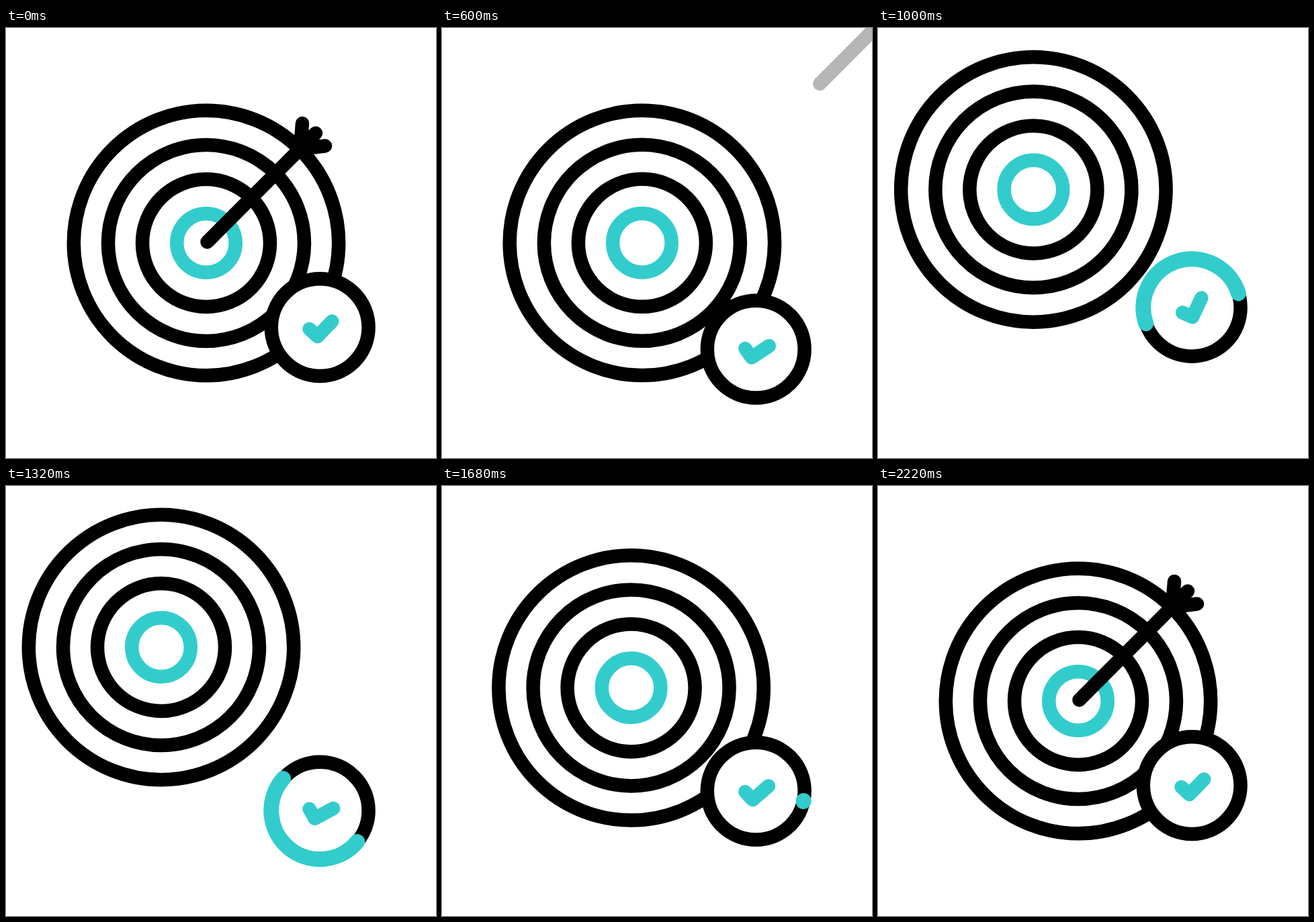
Recreate the animation shown at these times as an HTML page. Size 640 px wide and 640 px high, loop 2400 ms.

```html
<!DOCTYPE html>
<html lang="en">
<head>
<meta charset="utf-8">
<title>Target</title>
<style>
  html, body { margin: 0; width: 100%; height: 100%; overflow: hidden; background: #fff; }
  svg { display: block; width: 100%; height: 100%; }
  .line { fill: none; stroke: #000; stroke-width: 20.5; stroke-linecap: round; stroke-linejoin: round; }
  .teal { stroke: #3cc; }
  .wide { stroke-width: 23; }
</style>
</head>
<body>
<svg viewBox="0 0 640 640">
  <g id="target" class="line">
    <circle cx="298" cy="320" r="197.2"/>
    <circle cx="298" cy="320" r="146"/>
    <circle cx="298" cy="320" r="95"/>
    <circle cx="298" cy="320" r="43.8" class="teal"/>
  </g>
  <g id="streaks" class="line teal">
    <path/>
    <path/>
  </g>
  <path id="arrow" class="line" d="M299.5 318.5L461 156.5M441 142L438 180L475 175.5"/>
  <g id="badge">
    <circle class="line" cx="467.2" cy="445.6" r="72.4" style="fill:#fff"/>
    <path id="sweep" class="line teal wide"/>
    <g id="tick">
      <path class="line teal" d="M451.5 448L463.5 459L485.3 436.5"/>
      <path id="pulse" class="line wide" d="M451.5 448L463.5 459L485.3 436.5"/>
    </g>
  </g>
</svg>
<script>
const LOOP = 2400;
const CX = 467.2, CY = 445.6, R = 72.4;
const el = id => document.getElementById(id);
const set = (node, name, value) => node.setAttribute(name, value);
const show = (node, on) => set(node, 'visibility', on ? 'visible' : 'hidden');

// Smooth progress from 0 to 1 between two times
function ease(t, from, to) {
  const u = Math.min(1, Math.max(0, (t - from) / (to - from)));
  return u * u * (3 - 2 * u);
}

// Monotone cubic curve through [time, value] keys
function track(keys) {
  const secant = i => (keys[i + 1][1] - keys[i][1]) / (keys[i + 1][0] - keys[i][0]);
  const slopes = keys.map((k, i) => {
    if (i === 0 || i === keys.length - 1) return 0;
    const a = secant(i - 1), b = secant(i);
    return a * b > 0 ? 2 * a * b / (a + b) : 0;
  });
  return t => {
    if (t <= keys[0][0]) return keys[0][1];
    for (let i = 0; i < keys.length - 1; i++) {
      const [t0, v0] = keys[i], [t1, v1] = keys[i + 1];
      if (t > t1) continue;
      const h = t1 - t0, u = (t - t0) / h, s = u * u * (3 - 2 * u);
      return v0 + (v1 - v0) * s
        + h * u * (1 - u) * ((1 - u) * slopes[i] - u * slopes[i + 1]);
    }
    return keys[keys.length - 1][1];
  };
}

const bob = track([[200, 0], [380, 20], [545, 37.5], [760, -3.5], [950, -36],
  [1000, -29.5], [1280, 33.5], [1320, 37.5], [1560, 20], [1820, 0]]);
const tilt = track([[200, 0], [380, 5.5], [660, 13], [760, 8.5], [1000, -19],
  [1060, -20], [1340, 18], [1560, 11], [1820, 0]]);
const sweepTail = track([[690, 0], [760, 2], [1000, 28.5], [1320, 150], [1560, 280], [1690, 360]]);
const sweepHead = t => 360 - sweepTail(2320 - t);

function drawTarget(t) {
  const k = ease(t, 590, 1020) - ease(t, 1385, 1822);
  set(el('target'), 'transform', `translate(${-67 * k} ${-80 * k})`);
}

function drawArrow(t) {
  const away = ease(t, 200, 820) - ease(t, 1750, 2220);
  const swing = t > 200 && t < 560 ? Math.sin(Math.PI * (t - 200) / 360) : 0;
  const x = 368 * away - 7 * swing, y = -330 * away + 25 * swing;
  set(el('arrow'), 'transform', `translate(${x} ${y}) rotate(${16 * swing} 441 178)`);
  set(el('arrow'), 'opacity', 1 - away);
}

function drawStreaks(t) {
  const head = 70 * ease(t, 1800, 2000), tail = 70 * ease(t, 1900, 2110);
  const starts = [[451.3, 72.2], [594.3, 141.2]];
  [...el('streaks').children].forEach((p, i) => {
    const [x, y] = starts[i], a = tail * Math.SQRT1_2, b = head * Math.SQRT1_2;
    set(p, 'd', `M${x - a} ${y + a}L${x - b} ${y + b}`);
    show(p, head - tail > 0.5);
  });
}

function rim(progress) {
  const a = (11.5 - progress) * Math.PI / 180;
  return `${CX + R * Math.cos(a)} ${CY + R * Math.sin(a)}`;
}

function drawBadge(t) {
  set(el('badge'), 'transform', `translate(0 ${bob(t)})`);
  set(el('tick'), 'transform', `rotate(${tilt(t)} ${CX} ${CY})`);

  const tail = sweepTail(t), head = sweepHead(t), span = head - tail;
  set(el('sweep'), 'd', `M${rim(tail)}A${R} ${R} 0 ${span > 180 ? 1 : 0} 0 ${rim(head)}`);
  show(el('sweep'), span > 0.5);

  const size = el('pulse').getTotalLength();
  const from = size * ease(t, 1950, 2180), to = size * ease(t, 1810, 2010);
  set(el('pulse'), 'stroke-dasharray', `0 ${from} ${to - from} 200`);
  show(el('pulse'), to - from > 0.1);
}

function draw(t) {
  drawTarget(t);
  drawArrow(t);
  drawStreaks(t);
  drawBadge(t);
}

const start = performance.now();
function tick(now) {
  draw(Math.max(0, now - start) % LOOP);
  requestAnimationFrame(tick);
}
draw(0);
requestAnimationFrame(tick);
</script>
</body>
</html>
```
